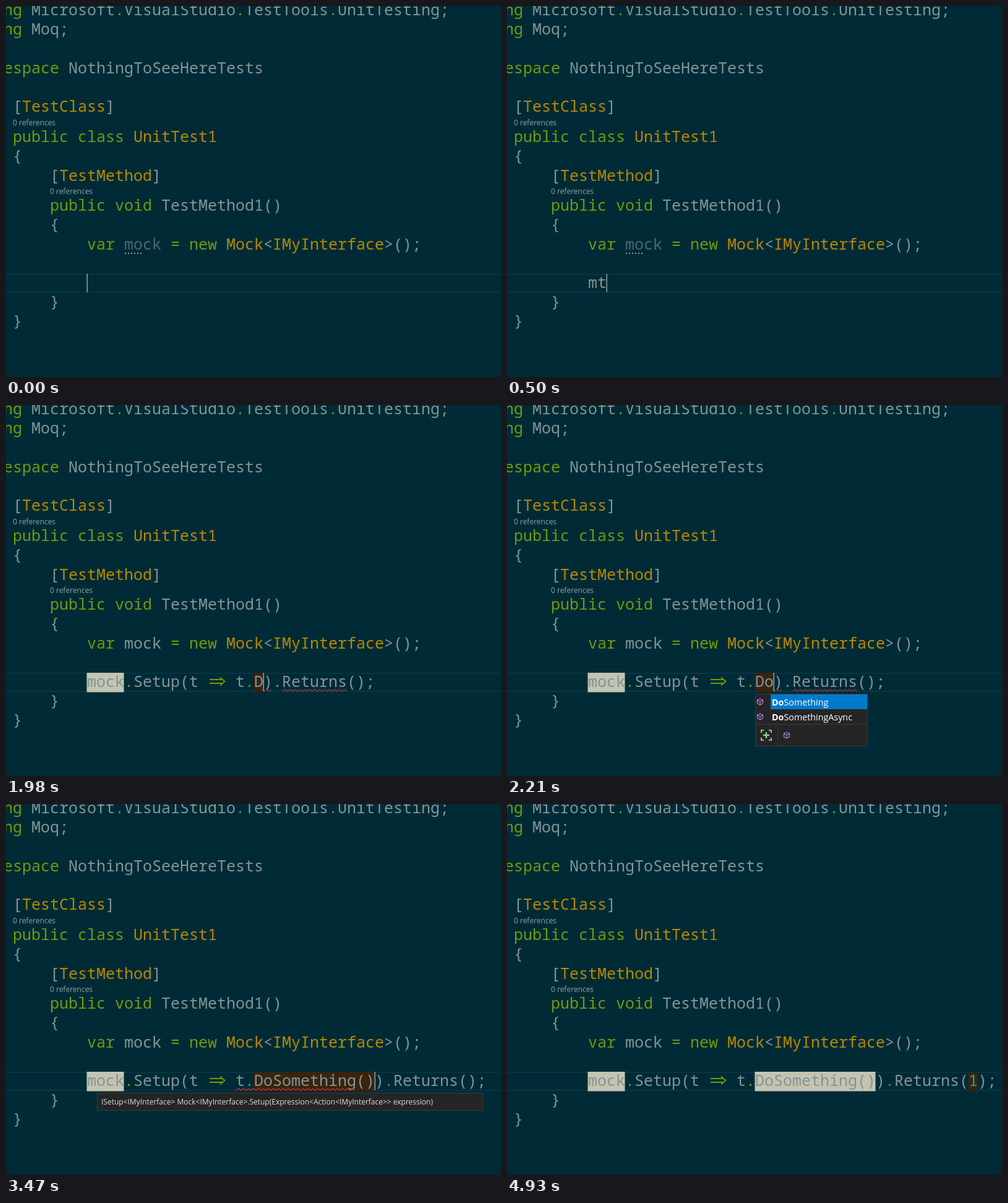
An HTML page that plays this animation: 800x600 px, repeating every 5090 ms.

```html
<!DOCTYPE html>
<html lang="en">
<head>
<meta charset="utf-8">
<title>Code template</title>
<style>
html, body { margin: 0; width: 100%; height: 100%; overflow: hidden; background: #002b36; }
svg { display: block; width: 800px; height: 600px; }
text { white-space: pre; }
.code { font: 25px "Noto Sans Mono", "DejaVu Sans Mono", monospace; }
.ui { font-family: "Open Sans", "Noto Sans", sans-serif; }
</style>
</head>
<body>
<svg viewBox="0 0 800 600">
  <g id="live"></g>
  <g id="still"></g>
  <g id="over"></g>
</svg>
<script>
const LOOP = 5090, CELL = 15, LEFT = 131, ROW = 24;
const grey = "#839496", green = "#719a07", gold = "#b58900", cyan = "#2aa198", faded = "#4a6872";
const brown = "#38240f", light = "#c3c4b1", red = "#c23431", dimRed = "#8f3a38";
const live = document.getElementById("live");
const still = document.getElementById("still");
const over = document.getElementById("over");

function add(parent, tag, attrs, content) {
  const el = document.createElementNS("http://www.w3.org/2000/svg", tag);
  for (const key in attrs) el.setAttribute(key, attrs[key]);
  if (content !== undefined) el.textContent = content;
  parent.append(el);
  return el;
}
const rect = (g, x, y, width, height, fill) => add(g, "rect", { x, y, width, height, fill });
const stroke = (g, d, color, width = 1) =>
  add(g, "path", { d, fill: "none", stroke: color, "stroke-width": width });
const colX = col => LEFT + col * CELL;

// Tokens alternate between colour and text.
function codeLine(g, x, y, ...tokens) {
  for (let i = 0; i < tokens.length; i += 2) {
    add(g, "text", { class: "code", x, y, fill: tokens[i] }, tokens[i + 1]);
    x += tokens[i + 1].length * CELL;
  }
}
function label(g, x, y, size, fill, string) {
  return add(g, "text", { class: "ui", x, y, "font-size": size, fill }, string);
}

function drawStill() {
  codeLine(still, -49, 15, green, "using ", grey, "Microsoft", green, ".", grey, "VisualStudio",
    green, ".", grey, "TestTools", green, ".", grey, "UnitTesting;");
  codeLine(still, -49, 46, green, "using ", grey, "Moq;");
  codeLine(still, -49, 109, green, "namespace ", grey, "NothingToSeeHereTests");
  codeLine(still, 11, 171, grey, "[", gold, "TestClass", grey, "]");
  label(still, 11, 193, 12, "#93a1a1", "0 references");
  codeLine(still, 11, 220, green, "public class ", gold, "UnitTest1");
  codeLine(still, 11, 251, grey, "{");
  codeLine(still, 71, 283, grey, "[", gold, "TestMethod", grey, "]");
  label(still, 71, 304, 12, "#93a1a1", "0 references");
  codeLine(still, 71, 331, green, "public void ", grey, "TestMethod1()");
  codeLine(still, 71, 362, grey, "{");
  codeLine(still, 131, 394, green, "var      = new ", gold, "Mock", grey, "<",
    gold, "IMyInterface", grey, ">();");
  codeLine(still, 71, 487, grey, "}");
  codeLine(still, 11, 518, grey, "}");
}

const icons = {
  snippet(x, y) {
    stroke(over, `M${x - 6.5} ${y + 7}V${y - 7.5}H${x + 6.5}V${y + 7}`, "#d0d0d0", 1.2);
    stroke(over, `M${x - 6} ${y + 7}H${x + 7}`, "#d0d0d0", 1.4).setAttribute("stroke-dasharray", "2 2");
  },
  local(x, y) {
    stroke(over, `M${x - 5} ${y - 5}h-3v9h3M${x + 5} ${y - 5}h3v9h-3`, "#d0d0d0", 1.4);
    add(over, "path", { d: `M${x - 5} ${y}l6-4 4 2v3l-6 3-4-2z`, fill: "#e0e0e0" });
  },
  method(x, y) {
    stroke(over, `M${x} ${y - 5}l4.5 2.3v5.2L${x} ${y + 5}l-4.5-2.5v-5.2z` +
      `M${x - 4.5} ${y - 2.7}L${x} ${y}l4.5-2.7M${x} ${y}v5`, "#b180d7", 1.1);
  }
};

const list = (x, width, kind, typed, items, selected, extra) =>
  ({ x, width, kind, typed, items, selected, ...extra });

function drawList(p) {
  const height = p.items.length * ROW + 37;
  rect(over, p.x, 467, p.width, height, "#3a3a3d");
  rect(over, p.x + 1, 468, p.width - 2, height - 2, "#252526");
  p.items.forEach((item, i) => {
    const top = 468 + i * ROW;
    const right = p.x + p.width - (p.scroll ? 21 : 1);
    if (i === p.selected) rect(over, p.x + 25, top, right - p.x - 25, ROW, "#007acc");
    const kind = item === "mock" ? "local" : p.kind;
    icons[kind](p.x + (kind === "method" ? 8 : 12.5), top + 12);
    const at = item.toLowerCase().indexOf(p.typed.toLowerCase());
    const end = at + p.typed.length;
    const t = label(over, p.x + 27, top + 18, 14.3, "#fff", item.slice(0, at));
    add(t, "tspan", { "font-weight": 700 }, item.slice(at, end));
    add(t, "tspan", {}, item.slice(end));
  });
  if (p.scroll) {
    const x = p.x + p.width - 21;
    rect(over, x, 468, 21, 132, "#3e3e42");
    add(over, "path", { d: `M${x + 5} 482l5.5-6 5.5 6z`, fill: "#999" });
    rect(over, x + 5, 489, 11, 10, "#686868");
    return;
  }
  const y = 468 + p.items.length * ROW;
  rect(over, p.x, y, p.width, 1, "#3a3a3d");
  rect(over, p.x + 36, y, 1, 36, "#3a3a3d");
  const cx = p.x + 18, cy = y + 18;
  for (const [sx, sy] of [[1, 1], [1, -1], [-1, 1], [-1, -1]])
    stroke(over, `M${cx + 4 * sx} ${cy + 8 * sy}h${4 * sx}v${-4 * sy}`, "#d0d0d0", 1.6);
  stroke(over, `M${cx - 5} ${cy}h10M${cx} ${cy - 5}v10`, "#89d185", 2.4);
  icons.method(p.x + 51, cy);
}

function drawTip(string) {
  rect(over, 147, 467, 624, 29, "#3a3a3d");
  rect(over, 148, 468, 622, 27, "#252526");
  label(over, 154, 486, 12, "#ddd", string);
}

function squiggle(from, to, color) {
  let d = `M${colX(from) + 1} 463`;
  for (let x = colX(from) + 1, i = 0; x < colX(to) - 3; x += 4, i++) d += `l4 ${i % 2 ? 3 : -3}`;
  stroke(over, d, color, 1.4);
}

const listM = list(131, 354, "snippet", "m", ["mbox", "mn", "mock", "mr", "mra", "mt"], 5, { scroll: true });
const listMt = list(131, 354, "snippet", "mt", ["mt", "MTAThread", "MTAThreadAttribute"], 0);
const listD = list(401, 182, "method", "D", ["DoSomething", "DoSomethingAsync", "field", "GetHashCode"], 0);
const listDo = list(401, 182, "method", "Do", ["DoSomething", "DoSomethingAsync"], 0);
const tip = "ISetup<IMyInterface> Mock<IMyInterface>.Setup(Expression<Action<IMyInterface>> expression)";

// Each step changes only the listed parts of the state.
const steps = [
  [0, { raw: "", caret: 0, band: true, errors: [], list: null, tip: null, used: false }],
  [130, { raw: "m", caret: 1 }],
  [200, { list: listM }],
  [270, { raw: "mt", caret: 2, list: listMt }],
  [500, { list: null }],
  [750, { used: true }],
  [980, { raw: null, arg: "", ret: "", caret: 4, band: false, mockBg: "#4a4038", argBg: brown,
          argSpan: 0, op: grey, dot: grey, errors: ["end"], errorColor: "#8f4946" }],
  [1300, { op: green, dot: green }],
  [1450, { mockBg: light, caret: 18, band: true }],
  [1530, { errors: ["close", "returns"], errorColor: dimRed }],
  [1980, { arg: "D", argSpan: 1, caret: 19, dot: grey }],
  [2060, { list: listD }],
  [2210, { arg: "Do", argSpan: 2, caret: 20, list: listDo }],
  [2550, { arg: "DoSomething", argSpan: 11, caret: 29, list: null }],
  [3070, { caret: null, errors: ["arg"], errorColor: red, dot: "#7b7a20" }],
  [3300, { arg: "DoSomething()", argSpan: 13, caret: 30 }],
  [3380, { tip }],
  [3460, { caret: 31 }],
  [3540, { tip: null }],
  [3620, { argBg: light, argSpan: 11, caret: 41 }],
  [3790, { argSpan: 13 }],
  [4000, { errors: ["returns"] }],
  [4170, { caret: null }],
  [4400, { ret: "1", caret: 42, retColor: grey }],
  [4470, { retColor: cyan }],
  [4850, { errors: [] }],
  [4930, { caret: null }]
];

function drawTemplate(s) {
  const n = s.arg.length;
  const mark = (col, len, fill) => rect(live, colX(col) - 0.5, 433, len * CELL, 31.5, fill);
  mark(0, 4, s.mockBg);
  if (s.argSpan) mark(18, s.argSpan, s.argBg);
  if (s.ret) mark(28 + n, 1, brown);
  codeLine(live, LEFT, 456, grey, "mock", s.op, ".", grey, "Setup(t    t", s.op, ".",
    grey, s.arg + ")", s.dot, ".", grey, "Returns(", s.retColor || grey, s.ret, grey, ");");
  stroke(live, "M329 444H350M329 450H350M346 440.5L353.5 447L346 453.5", s.op, 1.8);
  const spans = { end: [30 + n, 31.2 + n], close: [18 + n, 19 + n], returns: [20 + n, 27 + n], arg: [16, 29] };
  for (const name of s.errors) squiggle(...spans[name], s.errorColor);
}

function draw(s) {
  live.replaceChildren();
  over.replaceChildren();
  if (s.band) {
    rect(live, 0, 433, 800, 2, "#073642");
    rect(live, 0, 462, 800, 2, "#073642");
  }
  codeLine(live, 191, 394, s.used ? grey : faded, "mock");
  if (!s.used) for (let i = 0; i < 6; i++) rect(live, 192 + i * 5, 399, 2, 2, "#93a1a1");
  if (s.raw === null) drawTemplate(s);
  else codeLine(live, LEFT, 456, grey, s.raw);
  if (s.caret !== null) rect(over, colX(s.caret) - 0.5, 433, 1.5, 30, "#93a1a1");
  if (s.list) drawList(s.list);
  if (s.tip) drawTip(s.tip);
}

let shown = -1;
function tick() {
  const t = performance.now() % LOOP;
  const count = steps.filter(step => step[0] <= t).length;
  if (count !== shown) {
    shown = count;
    draw(Object.assign({}, ...steps.slice(0, count).map(step => step[1])));
  }
  requestAnimationFrame(tick);
}
drawStill();
tick();
</script>
</body>
</html>
```
